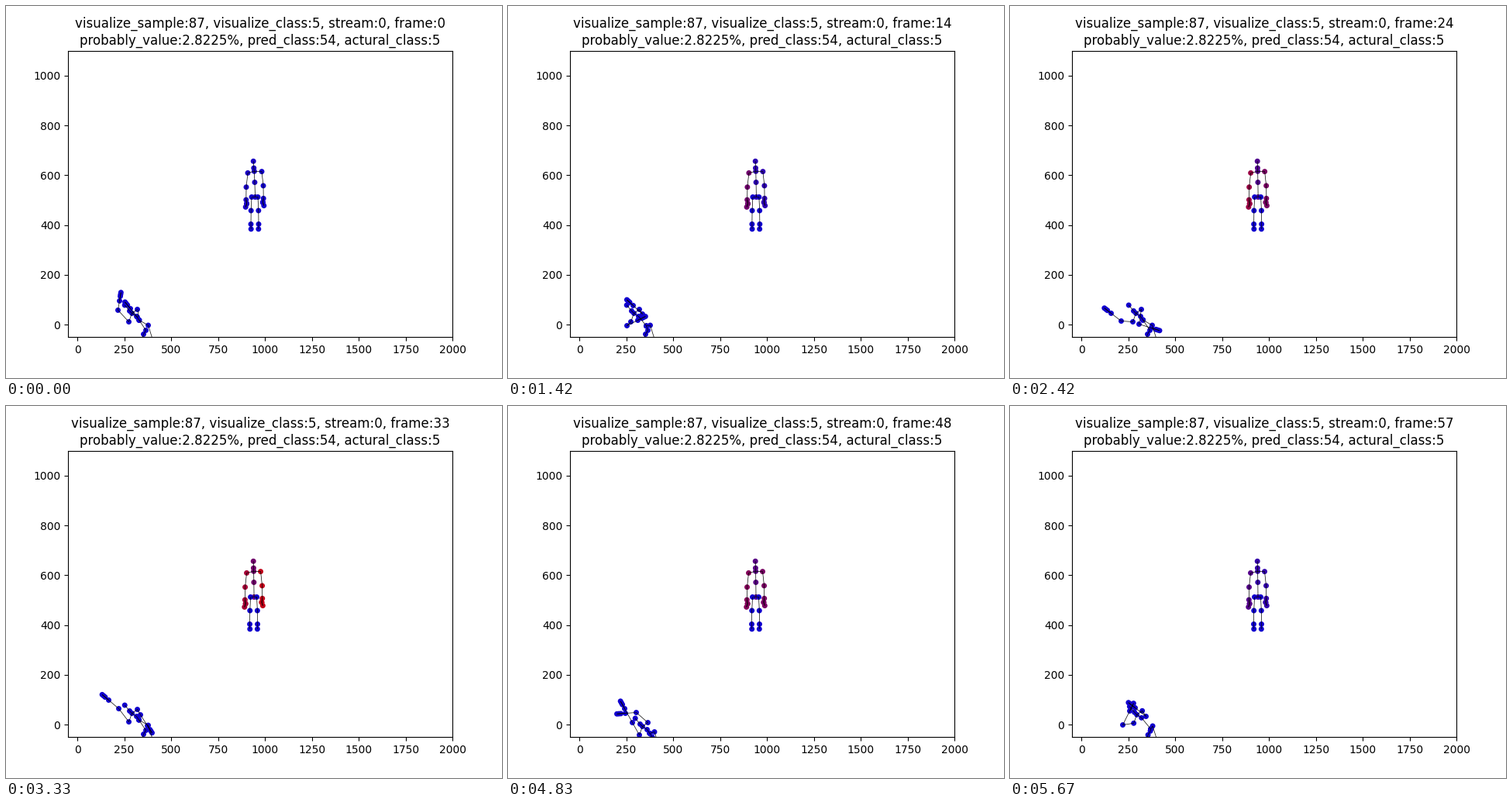
A matplotlib script that plays this animation: 640 by 480 pixels, repeating every 5.76 s.

```python
import numpy as np
import matplotlib.pyplot as plt
from matplotlib.animation import FuncAnimation
from matplotlib.collections import LineCollection

W, H = 640, 480
LOOP, STEP = 5760, 30
LAST = 57

# Joint order: head, neck, chest, mid, base, then two arms
# (shoulder, elbow, wrist, hand, tip, thumb) and two legs (hip, knee, ankle, foot).
BONES = [(0, 1), (1, 2), (2, 3), (3, 4)]
for s in (5, 11):
    BONES += [(2, s), (s, s + 1), (s + 1, s + 2), (s + 2, s + 3),
              (s + 3, s + 4), (s + 2, s + 5), (s + 4, s + 5)]
for s in (17, 21):
    BONES += [(4, s), (s, s + 1), (s + 1, s + 2), (s + 2, s + 3)]
BONES = np.array(BONES)

# Upright body: height down the stage, and half width for mirrored limbs.
TRUNK_Y = [199.8, 208.6, 212.8, 227, 246]
ARM_W, ARM_Y = [9, 11, 11.2, 10.4, 11.8, 10.4], [214, 232.3, 248.7, 254, 258, 253.5]
LEG_W, LEG_Y = [4, 4.8, 5, 4.8], [246, 263.5, 281, 287.3]

# Crouched body: resting trunk, shoulders and legs.
TRUNK = np.array([(152.7, 385.5), (159, 393), (162, 396), (168, 400), (171, 404.5)])
SHOULDERS = np.array([(158, 407), (169, 391)])
LEGS = np.array([[(0, 0), (180, 418), (177, 423), (173, 436)],
                 [(0, 0), (183, 411.5), (190, 434), (195, 448)]])

# Elbow and wrist waypoints of the waving arms.
WAVE = [0, 8, 14, 24, 33, 48, 57]
ARM_A = [[(144, 392), (156, 405), (153, 412), (143, 406), (145, 390), (160, 408), (145, 411)],
         [(146, 380), (159, 386), (167, 405), (130, 396), (132, 379), (150, 390), (154, 393)]]
ARM_B = [[(169, 401), (180, 406), (173, 397), (166, 410), (173, 398), (165, 395), (175, 400)],
         [(160, 390), (168, 411), (161, 386), (182, 415), (182, 412), (151, 396), (161, 389)]]


def to_data(p):
    """Pixel positions to axis units."""
    x = (p[:, 0] + .5 - 80) / 496 * 2050 - 50
    y = 1100 - (p[:, 1] + .5 - 57.6) / 369.6 * 1150
    return np.stack([x, y], axis=1)


def bump(t, center, width):
    return np.exp(-((t - center) / width) ** 2)


def standing(t):
    mid = 319 + 1.5 * np.exp(-t / 10)
    trunk = np.stack([np.linspace(318.7, mid + .5, 5), TRUNK_Y], axis=1)
    parts = [trunk]
    for width, height, tilt in ((ARM_W, ARM_Y, .9), (LEG_W, LEG_Y, 0)):
        for side in (-1, 1):
            parts.append(np.stack([mid + side * np.array(width),
                                   np.array(height) - side * tilt], axis=1))
    return np.concatenate(parts)


def waving_arm(shoulder, path, t):
    elbow, wrist = (np.array([np.interp(t, WAVE, axis) for axis in zip(*way)])
                    for way in path)
    aim = (wrist - elbow) / np.hypot(*(wrist - elbow))
    return np.array([shoulder, elbow, wrist,
                     wrist + 6 * aim, wrist + 11 * aim, wrist + 8.5 * aim])


def crouched(t):
    lean = bump(t, 48, 6) * np.array([11, 17])
    dip = (bump(t, 11, 6) + bump(t, 57, 5)) * np.array([9, 10])
    trunk = TRUNK + lean
    trunk[4] += dip
    legs = LEGS + .5 * lean
    legs[:, 0] = trunk[4]
    arms = [waving_arm(s + lean, path, t) for s, path in zip(SHOULDERS, (ARM_A, ARM_B))]
    return np.concatenate([trunk, *arms, *legs])


def redness(t):
    """Upright body warms up limb by limb; the crouched one stays blue."""
    trunk = .12 + .42 * bump(t, 37, 18)
    arm_a = .12 + .64 * np.sin(np.pi * t / 66)
    arm_b = .08 + .84 * bump(t, 36, 16)
    return np.repeat([trunk, arm_a, arm_b, .08], [5, 6, 6, 33])


fig, ax = plt.subplots(figsize=(W / 100, H / 100), dpi=100)
ax.set_xlim(-50, 2000)
ax.set_ylim(-50, 1100)
title = ax.set_title(" \n ")
dots = ax.scatter(np.zeros(50), np.zeros(50), s=25, linewidths=0, zorder=1)
lines = ax.add_collection(LineCollection([], colors="black", linewidths=0.5, zorder=2),
                          autolim=False)


def shown(i):
    """Ten poses a second, sampled on twelve ticks a second."""
    tick = (i * STEP + 25) * 12 // 1000
    return min((5 * tick + 2) // 6, LAST)


def update(i):
    n = shown(i)
    p, q = to_data(standing(n)), to_data(crouched(n))
    heat = redness(n)
    dots.set_offsets(np.concatenate([p, q]))
    dots.set_facecolor(np.stack([.85 * heat, 0 * heat, .88 * (1 - heat)], axis=1))
    lines.set_segments(np.concatenate([p[BONES], q[BONES]]))
    title.set_text(f"visualize_sample:87, visualize_class:5, stream:0, frame:{n}\n"
                   "probably_value:2.8225%, pred_class:54, actural_class:5")
    return dots, lines, title


anim = FuncAnimation(fig, update, frames=LOOP // STEP, interval=STEP,
                     repeat=True, repeat_delay=0, blit=False)
plt.show()
```
